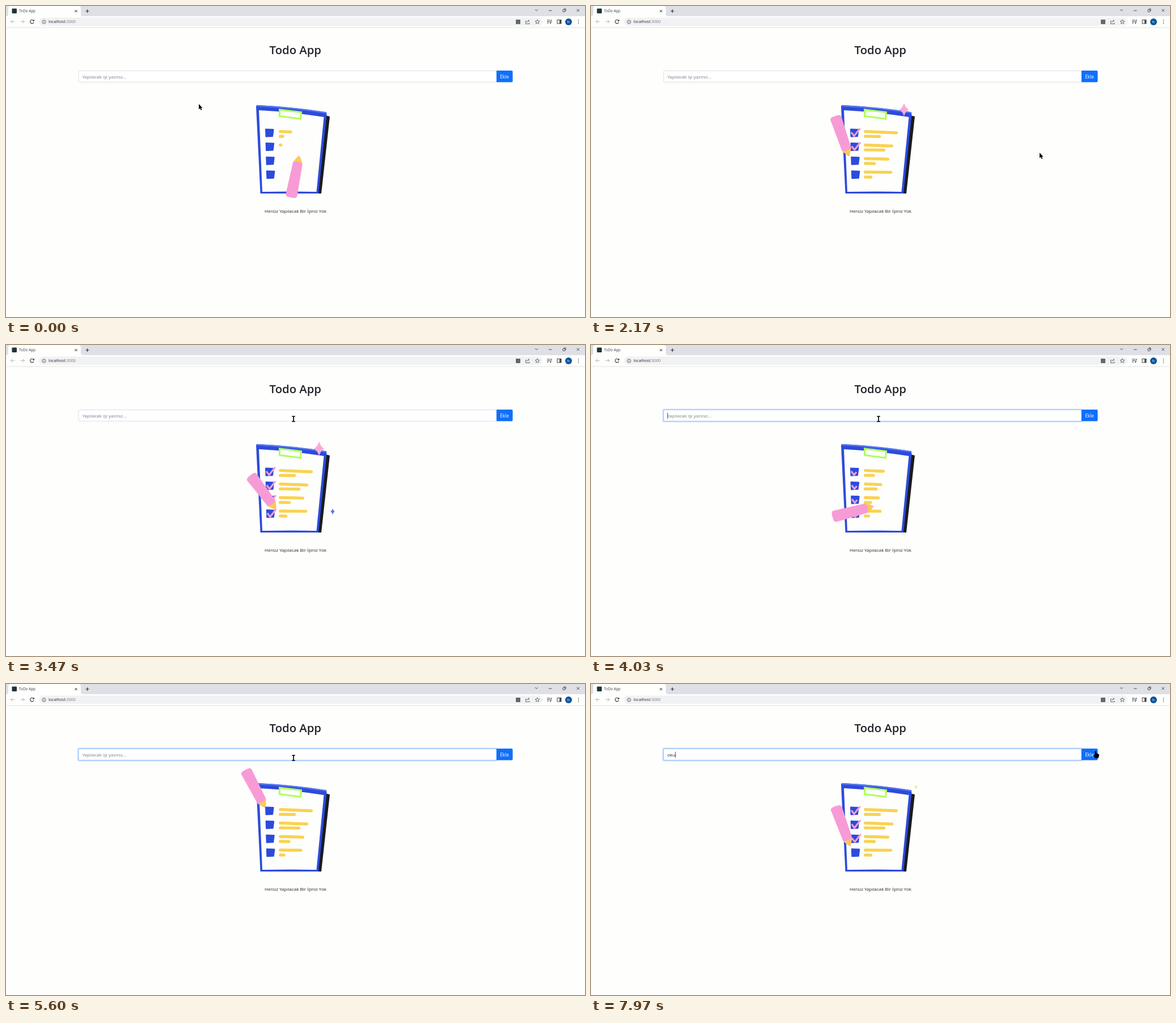
These frames come from a looping animation (1021x549 px, 8000 ms). An HTML page:

```html
<!DOCTYPE html>
<html lang="tr">
<head>
<meta charset="utf-8">
<title>ToDo App</title>
<style>
  html, body { margin: 0; width: 100%; height: 100%; overflow: hidden; background: #fefefc; }
  svg { display: block; width: 100vw; height: 100vh; }
  text { font-family: "Open Sans", "Noto Sans", sans-serif; font-size: 8px; fill: #212529; }
  .icon { fill: none; stroke: #45484c; stroke-width: 1; }
  .pale { stroke: #b4b7bb; }
</style>
</head>
<body>
<svg viewBox="0 0 1021 549" preserveAspectRatio="none">
  <rect width="1021" height="549" fill="#fefefc"/>

  <!-- Browser window -->
  <rect width="1021" height="18" fill="#dee0e6"/>
  <path d="M0 18Q4 18 4 14V4Q4 0 8 0H128Q132 0 132 4V14Q132 18 136 18Z" fill="#fefefc"/>
  <path d="M0 38H1021" stroke="#e2e2e0"/>
  <rect x="58" y="20.5" width="888" height="14.5" rx="7.2" fill="#f1f2f4"/>
  <rect x="10.5" y="4.5" width="8.5" height="8.5" rx="1" fill="#20323b"/>
  <text x="23" y="11.3" style="font-size:6.4px;fill:#3c4043">ToDo App</text>
  <text x="75" y="30.4" style="font-size:7.1px">localhost<tspan fill="#73777b">:3000</tspan></text>
  <g class="icon">
    <path d="M121.5 7l4 4m0-4l-4 4M140.5 9h6m-3-3v6" stroke="#222"/>
    <path d="M933 6l2.500 2.500L938 6M957 8h5.500M1006.500 5.500l4.500 4.500m0-4.500l-4.500 4.500"/>
    <rect x="982" y="6.500" width="3.800" height="3.800" rx=".6"/><path d="M983.500 5h3.500v4"/>
    <path class="pale" d="M15.500 27.500h-7m3-3l-3 3l3 3M25.500 27.500h7m-3-3l3 3l-3 3"/>
    <path d="M48.500 25.500a3.300 3.300 0 1 0 .5 3.200M49.300 24v2.400h-2.400" stroke-width="1.2"/>
    <circle cx="67" cy="28" r="3.2" stroke-width=".8"/><path d="M67 27.500v2.200M67 25.800v.9" stroke-width=".9"/>
    <path d="M918 26.500h-1.500v5h6.500v-2M918.500 29q.5-3 4-3m-1.700-1.800l1.900 1.800l-1.900 1.800" stroke-width=".8"/>
    <path d="M937 24l1.100 2.500l2.700.2l-2 1.800l.6 2.700l-2.400-1.500l-2.400 1.500l.6-2.700l-2-1.800l2.700-.2Z" stroke-width=".8"/>
    <path d="M954 25h5.500M954 27.500h5.500M954 30h3M961 30v-5h2"/><circle cx="960" cy="30" r=".8"/>
    <rect x="972" y="24.500" width="7" height="6.500"/>
  </g>
  <rect x="899" y="24" width="8" height="8" rx="1" fill="#64686c"/>
  <rect x="976" y="24.500" width="3" height="6.500" fill="#45484c"/>
  <circle cx="992" cy="28" r="6" fill="#0b559f"/>
  <text x="992" y="30.2" text-anchor="middle" style="font-size:6px;fill:#fff">fc</text>
  <path d="M1009.500 25v.01M1009.500 28v.01M1009.500 31v.01" stroke="#333" stroke-width="1.5" stroke-linecap="round"/>

  <!-- Page -->
  <text x="510.3" y="84.700" text-anchor="middle" style="font-size:20.3px;font-weight:600">Todo App</text>
  <rect id="glow" x="126" y="112.400" width="741" height="24" rx="3" fill="#c2dbfe"/>
  <rect id="field" x="128" y="114.400" width="737" height="20" rx="2" fill="#fff" stroke-width=".8"/>
  <path d="M865 114H891.500Q893.500 114 893.500 116V132.500Q893.500 134.500 891.500 134.500H865Z" fill="#0f6ffb"/>
  <text x="879" y="127.600" text-anchor="middle" style="font-size:8.2px;fill:#fff">Ekle</text>
  <text id="typed" x="134.500" y="127.600"></text>
  <path id="caret" stroke="#111" stroke-width=".8"/>
  <text x="510.500" y="365.300" text-anchor="middle">Henüz Yapılacak Bir İşiniz Yok</text>

  <!-- Clipboard -->
  <path d="M565 193.500L571 195L556 331H549Z" fill="#1b1b1d"/>
  <path d="M441 177Q441 175 444 175Q505 178 565 187.500L565.500 192L551 331H448.500Z" fill="#2c4bdb"/>
  <path d="M442 176Q505 179 565 188.500" fill="none" stroke="#5878ef" stroke-width="2.500"/>
  <path d="M446 184Q505 187 560.500 196L547.500 328Q500 327 452 328Z" fill="#fefefc"/>
  <path d="M482.500 183L520.500 187.500L519.500 199.300L482.500 194.500Z" fill="#fefefc" stroke="#adff5c" stroke-width="3"/>
  <g id="boxes" fill="#2c4bdb" stroke="#2c4bdb" stroke-width="2" stroke-linejoin="round"></g>
  <g id="lines" stroke="#f9d250" stroke-width="5.200" stroke-linecap="round"></g>
  <g id="ticks" fill="none" stroke="#f79bd6" stroke-width="3.200"></g>
  <g id="sparks"></g>
  <g id="pencil">
    <path d="M0 0L4 6H-4Z" fill="#f79bd6"/>
    <path d="M-3 3.500Q0 2 3 3.500L8.500 13Q0 11 -8.500 13Z" fill="#f9cc4e"/>
    <path d="M-8.500 13Q0 10 8.500 13L10.200 72Q9 76 0 75.500Q-9 76 -10.200 72Z" fill="#f79bd6"/>
  </g>

  <g id="pointer">
    <path id="arrow" d="M0 0V9.500L2.200 7.600L3.700 11L5.300 10.300L3.900 7H6.500Z"/>
    <path id="beam" d="M-2.800 -4.500H2.800M0 -4.500V4.500M-2.800 4.500H2.800" stroke="#000" stroke-width="1.700"/>
    <path id="hand" d="M-1.500 -5.500Q0 -7 1 -5.500L1.500 -2L5 -1Q6.500 0 6 2L4.500 6.500H-1L-4 2Q-4 0 -1.500 1Z"/>
  </g>
</svg>
<script>
const LOOP = 8000, CYCLE = 5100;
const $ = id => document.getElementById(id);
const clamp = v => Math.max(0, Math.min(1, v));
const ease = v => v * v * (3 - 2 * v);

function set(node, attrs) {
  for (const key in attrs) node.setAttribute(key, attrs[key]);
  return node;
}
function add(parent, tag, attrs = {}) {
  const node = document.createElementNS("http://www.w3.org/2000/svg", tag);
  return $(parent).appendChild(set(node, attrs));
}
function show(node, on) { node.style.display = on ? "" : "none"; }

// Keys are [time, ...values]; returns the eased values at t.
function track(keys, t) {
  const next = keys.findIndex(key => t < key[0]);
  if (next < 0) return keys.at(-1).slice(1);
  const a = keys[Math.max(0, next - 1)], b = keys[next];
  const u = ease(clamp((t - a[0]) / (b[0] - a[0])));
  return a.slice(1).map((v, k) => v + (b[k + 1] - v) * u);
}

// Four evenly spaced rows, each with a box, a tick and two lines.
const TICK_TIME = 400;
const rows = [0, 1, 2, 3].map(i => ({ x: 457 + i * .6, y: 216.500 + i * 24.600, start: 680 + i * 780 }));

const ticks = rows.map(({ x, y, start }) => {
  add("boxes", "path", { d: `M${x + 1} ${y + 1}l13.500 .5l-1.500 12l-11.500 .5Z` });
  const node = add("ticks", "path", {
    d: `M${x + 2} ${y + 6.500}l5 6.500l10.500 -13.500`, pathLength: 1, "stroke-dasharray": "1 2"
  });
  return { node, start };
});

const lines = [55, 25, 47, 33, 40, 16, 45, 10].map((length, k) => {
  const row = k >> 1, second = k % 2;
  const x = 483.600, y = 221.500 + row * 23.900 + second * 8.600;
  const slope = second ? .3 : 2.400 - row * .7;
  return { x, y, length, slope, start: -120 + k * 55, node: add("lines", "line", { x1: x, y1: y }) };
});

// The pencil rests upright, swings over, ticks every row and returns.
const pencilKeys = [
  [0, 517, 264, 11],
  ...rows.flatMap(({ x, y, start }) => [
    [start - 90, x - 4, y - 1, 162],
    [start, x + 2, y + 6.500, 155],
    [start + 140, x + 7, y + 13, 147],
    [start + TICK_TIME, x + 17.500, y, 143]
  ]),
  [3600, 477, 290, 143], [4500, 524, 278, -2], [4670, 524, 278, -2], [CYCLE, 517, 264, 11]
];

// Each spark twinkles a few times at a steady gap.
const sparks = [
  { x: 552, y: 183, size: 13, fill: "#f9a9dc", first: 2000, gap: 1470, count: 2, half: 600 },
  { x: 576, y: 294, size: 5.300, fill: "#5878ef", first: 1540, gap: 1930, count: 2, half: 400 },
  { x: 573, y: 182, size: 6.700, fill: "#c8ff94", first: 1540, gap: 1565, count: 3, half: 400 }
].map(s => ({
  ...s,
  node: add("sparks", "path", { fill: s.fill, d: "M0 -1Q.2 -.3 .7 0Q.2 .3 0 1Q-.2 .3 -.7 0Q-.2 -.3 0 -1Z" })
}));

function sparkSize({ size, first, gap, count, half }, p) {
  const nearest = Math.max(0, Math.min(count - 1, Math.round((p - first) / gap)));
  const away = Math.abs(p - first - nearest * gap) / half;
  return size * Math.cos(Math.min(1, away) * Math.PI / 2);
}

function drawClipboard(t) {
  const p = t % CYCLE;
  const q = p > 4800 ? p - CYCLE : p;
  const erase = clamp((4350 - q) / 550);
  const progress = (start, time) => Math.min(clamp((q - start) / time), erase);
  for (const { node, start, x, y, length, slope } of lines) {
    const u = progress(start, 360);
    show(node, u > 0);
    set(node, { x2: x + length * u, y2: y + slope * u });
  }
  for (const { node, start } of ticks) {
    const u = progress(start, TICK_TIME);
    show(node, u > 0);
    set(node, { "stroke-dashoffset": 1 - u });
  }
  for (const s of sparks) {
    const r = sparkSize(s, p);
    show(s.node, r > 1);
    set(s.node, { transform: `translate(${s.x} ${s.y}) scale(${r})` });
  }
  const [x, y, angle] = track(pencilKeys, p);
  set($("pencil"), { transform: `translate(${x} ${y}) rotate(${angle})` });
}

const FOCUS = 3900, TYPE_START = 6000, TYPE_GAP = 250, BLINK = 530, WORD = "oku";
const pointerKeys = [
  [0, 340, 173], [900, 436, 118], [2170, 791, 259],
  [3200, 507, 130.500], [6900, 507, 130.500], [7750, 890, 124.500]
];

function drawForm(t) {
  const focus = clamp((t - FOCUS) / 150);
  set($("glow"), { opacity: focus });
  set($("field"), { stroke: focus > .5 ? "#86b7fe" : "#d2d6db" });

  const count = Math.max(0, Math.min(WORD.length, Math.floor((t - TYPE_START) / TYPE_GAP) + 1));
  const typed = $("typed");
  typed.textContent = count ? WORD.slice(0, count) : "Yapilacak işi yazınız...";
  typed.style.fill = count ? "#212529" : "#777d83";

  const lastInput = count ? TYPE_START + (count - 1) * TYPE_GAP : FOCUS;
  const x = 135 + (count ? typed.getComputedTextLength() : 0);
  set($("caret"), { d: `M${x} 119.500V130` });
  show($("caret"), t >= FOCUS && (t - lastInput) % (2 * BLINK) < BLINK);

  const [px, py] = track(pointerKeys, t);
  set($("pointer"), { transform: `translate(${px} ${py})` });
  const kind = t < 3150 ? "arrow" : px > 865 ? "hand" : "beam";
  for (const id of ["arrow", "beam", "hand"]) show($(id), id === kind);
}

let origin;
function render(now) {
  origin ??= now;
  const t = (now - origin) % LOOP;
  drawClipboard(t);
  drawForm(t);
  requestAnimationFrame(render);
}
requestAnimationFrame(render);
</script>
</body>
</html>
```
